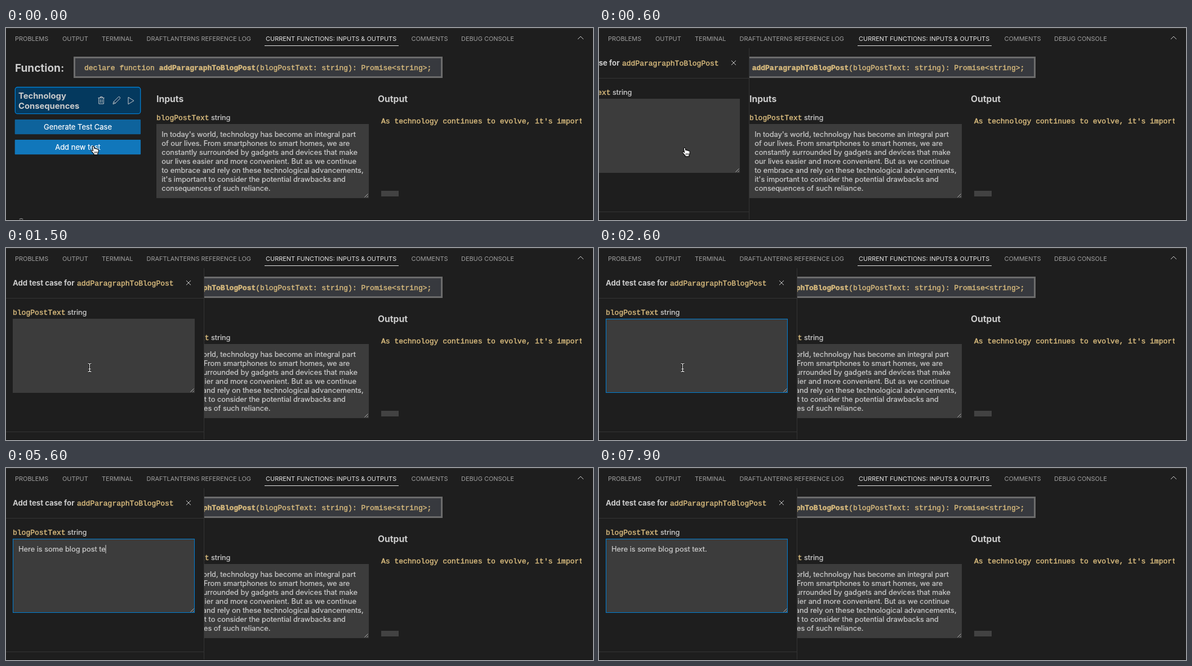
Write an HTML page that moves like this. It is 1042x342 px and loops after 8 s.

```html
<!DOCTYPE html>
<html lang="en">
<head>
<meta charset="utf-8">
<title>Add a test case</title>
<style>
  html, body { margin: 0; width: 100%; height: 100%; overflow: hidden; background: #1e1e1e; }
  svg { display: block; width: 1042px; height: 342px; }
  text { font: 12.83px Inter, "Liberation Sans", sans-serif; fill: #cccccc; stroke: #cccccc; stroke-width: .22px; white-space: pre; }
  .tab { font-size: 10.95px; fill: #a0a0a0; stroke: none; }
  .tab.on { fill: #e7e7e7; }
  .h1, .h2, .h3, .h4 { font-weight: 700; stroke: none; }
  .h1 { font-size: 19px; }
  .h2 { font-size: 15.7px; }
  .h3 { font-size: 14.75px; }
  .h4 { font-size: 13.2px; }
  .btn { font-size: 13px; fill: #ffffff; stroke: #ffffff; text-anchor: middle; }
  .code { font: 13px "Liberation Mono", "Courier New", monospace; fill: #d7ba7d; stroke: #d7ba7d; stroke-width: .45px; }
  .b { font-weight: 700; }
  .icon { fill: none; stroke: #cccccc; stroke-width: 1; stroke-linejoin: round; }
  .rule { fill: #343434; }
</style>
</head>
<body>
<svg viewBox="0 0 1042 342">
  <defs>
    <clipPath id="outClip"><rect x="660" y="150" width="362" height="30"/></clipPath>
    <path id="grip" d="M-7.5 -1.5L-1.5 -7.5M-3.5 -1.5L-1.5 -3.5" fill="none" stroke="#b5b5b5" stroke-width="1"/>
  </defs>
  <rect width="1042" height="342" fill="#1e1e1e"/>
  <rect width="1042" height="1" fill="#333333"/>

  <g id="tabs"></g>
  <rect x="459" y="31" width="238" height="1" fill="#e7e7e7"/>
  <path class="icon" d="M1015 20L1020 15L1025 20"/>

  <text class="h1" x="16" y="77.5">Function:</text>
  <rect x="121.5" y="52.5" width="652" height="35" fill="#37393e" stroke="#6c6c6c" stroke-width="3"/>
  <text class="code" x="139" y="75">declare function <tspan class="b">addParagraphToBlogPost</tspan>(blogPostText: string): Promise&lt;string&gt;;</text>

  <rect x="16.3" y="105.5" width="222.4" height="47.2" rx="4" fill="#04395e" stroke="#007fd4" stroke-width="1.3"/>
  <text class="h3" x="22" y="126">Technology</text>
  <text class="h3" x="22" y="144">Consequences</text>
  <g class="icon">
    <path d="M163.5 124.5H174.5M167.5 124.5V122.5H171V124.5M164.8 124.5V135H173.3V124.5M167.5 127V133M170.5 127V133"/>
    <path d="M190 135.5L191.2 131.2L199.5 122.9Q200.8 122 202 123.2Q203.2 124.5 202.2 125.7L194 134ZM191.2 131.2L194 134"/>
    <path d="M217 123.3L227 129.5L217 135.7Z"/>
  </g>

  <rect x="15.7" y="163" width="223.4" height="26.2" rx="1" fill="#0e639c"/>
  <text class="btn" x="127.5" y="181">Generate Test Case</text>
  <rect x="15.7" y="199" width="223.4" height="26.2" rx="1" fill="#1177bb"/>
  <text class="btn" x="127.5" y="217">Add new test</text>

  <text class="h2" x="267" y="132">Inputs</text>
  <text class="code" x="267" y="164">blogPostText</text>
  <text x="364" y="164">string</text>
  <rect x="267" y="171" width="377" height="132" fill="#3c3c3c"/>
  <g id="story"></g>
  <use href="#grip" x="644" y="303"/>

  <text class="h2" x="660" y="132">Output</text>
  <g clip-path="url(#outClip)">
    <text class="code" x="666" y="170">As technology continues to evolve, it's important to consider</text>
  </g>
  <rect x="666" y="290" width="31" height="10" fill="#424242"/>
  <circle cx="27" cy="343.5" r="4" fill="none" stroke="#b0b0b0"/>

  <g id="panel">
    <rect x="-1" y="36" width="352" height="306" fill="#1e1e1e"/>
    <rect class="rule" x="351" y="36" width="1" height="306"/>
    <rect class="rule" x="-1" y="89" width="352" height="1"/>
    <rect class="rule" x="-1" y="327" width="352" height="1"/>
    <text class="h4" x="12" y="67">Add test case for</text>
    <text class="code" x="126" y="67">addParagraphToBlogPost</text>
    <path class="icon" d="M320 58L328 66M328 58L320 66"/>
    <text class="code" x="12" y="119">blogPostText</text>
    <text x="109" y="119">string</text>
    <rect x="12" y="126" width="323" height="132" fill="#3c3c3c"/>
    <rect id="focus" x="12.5" y="126.5" width="322" height="131" fill="none" stroke="#007fd4"/>
    <use href="#grip" x="335" y="258"/>
    <text id="typed" x="22" y="149"></text>
    <rect id="caret" y="137" width="1" height="15" fill="#d8d8d8"/>
  </g>
  <rect y="341" width="1042" height="1" fill="#131313"/>

  <g id="hand">
    <path d="M-1.6 1C-1.6 -.5 .9 -.7 1.2 .9L1.9 4.3C2.3 3.5 4.1 3.6 4.4 4.8C5.2 4.1 6.6 4.4 6.9 5.5C7.9 5 9.1 5.6 9.2 6.8C9.5 9 9.2 11 7.9 13V15.4H1V13.6C-.6 12 -2 10.2 -3.5 8.8C-4.5 7.6 -3.2 6.3 -1.9 7.1L-.4 8.3Z" fill="#ffffff" stroke="#000000" stroke-width="1.1" stroke-linejoin="round"/>
    <path d="M2.5 9.5V12.8M4.5 9.5V12.8M6.5 9.5V12.8" stroke="#000000" stroke-width=".8"/>
  </g>
  <g id="beam" fill="none">
    <path d="M-3 -7.5Q0 -7.5 0 -5.5Q0 -7.5 3 -7.5M0 -5.5V5.5M-3 7.5Q0 7.5 0 5.5Q0 7.5 3 7.5M-2 2.5H2" stroke="#111111" stroke-width="3"/>
    <path d="M-3 -7.5Q0 -7.5 0 -5.5Q0 -7.5 3 -7.5M0 -5.5V5.5M-3 7.5Q0 7.5 0 5.5Q0 7.5 3 7.5M-2 2.5H2" stroke="#ffffff" stroke-width="1.1"/>
  </g>
</svg>
<script>
const $ = id => document.getElementById(id);
const LOOP = 8000, STEP = 100, CLICK = 2100, BLINK = 500;
const MESSAGE = 'Here is some blog post text.';

// [time, characters present after the edit]
const EDITS = [
  [CLICK, 0], [2800, 1], [3000, 2], [3100, 3], [3200, 5],
  [3400, 6], [3500, 7], [3600, 8], [3700, 10],
  [3900, 11], [4000, 12], [4100, 13], [4300, 14], [4400, 15],
  [4600, 16], [4700, 17], [4800, 18], [5000, 19], [5100, 20],
  [5200, 21], [5300, 22], [5400, 23], [5500, 24], [5600, 25],
  [6200, 24], [6700, 25], [6800, 26], [7000, 27], [7400, 28]
];

function addText(parent, x, y, str, cls) {
  const el = document.createElementNS('http://www.w3.org/2000/svg', 'text');
  el.setAttribute('x', x);
  el.setAttribute('y', y);
  if (cls) el.setAttribute('class', cls);
  el.textContent = str;
  $(parent).append(el);
}

[[16, 'PROBLEMS'], [100, 'OUTPUT'], [170, 'TERMINAL'], [249.5, 'DRAFTLANTERNS REFERENCE LOG'],
 [461, 'CURRENT FUNCTIONS: INPUTS & OUTPUTS'], [719.5, 'COMMENTS'], [808, 'DEBUG CONSOLE']]
  .forEach(([x, label], i) => addText('tabs', x, 23, label, i === 4 ? 'tab on' : 'tab'));

["In today's world, technology has become an integral part",
 'of our lives. From smartphones to smart homes, we are',
 'constantly surrounded by gadgets and devices that make',
 'our lives easier and more convenient. But as we continue',
 'to embrace and rely on these technological advancements,',
 "it's important to consider the potential drawbacks and",
 'consequences of such reliance.']
  .forEach((line, i) => addText('story', 276.3, 194 + 16 * i, line));

const clamp = v => Math.min(1, Math.max(0, v));
const mix = (a, b, k) => a + (b - a) * k;
const span = (t, from, to) => clamp((t - from) / (to - from));
const show = (id, on) => $(id).setAttribute('visibility', on ? 'visible' : 'hidden');
const move = (id, x, y) => $(id).setAttribute('transform', `translate(${x} ${y})`);

// cubic-bezier(.4, 0, .2, 1)
function ease(x) {
  if (x <= 0 || x >= 1) return clamp(x);
  let lo = 0, hi = 1;
  for (let i = 0; i < 24; i++) {
    const s = (lo + hi) / 2, r = 1 - s;
    if (1.2 * r * r * s + .6 * r * s * s + s * s * s < x) lo = s; else hi = s;
  }
  return 3 * (1 - lo) * lo * lo + lo ** 3;
}

function draw(time) {
  const t = Math.floor(time / STEP) * STEP;

  const slide = ease(span(t, 439, 769));
  show('panel', slide > 0);
  move('panel', Math.round(mix(-352, 0, slide)), 0);

  const aim = span(t, 0, 500);
  show('hand', t < 1000);
  move('hand', mix(155, 152, aim), mix(210.5, 213.5, aim));

  const drift = span(t, 900, 1500);
  show('beam', t >= 1000 && t < 2800);
  move('beam', mix(152, 148.5, drift), mix(214, 213, drift));

  const edit = EDITS.filter(e => e[0] <= t).pop();
  show('focus', edit);
  $('typed').textContent = edit ? MESSAGE.slice(0, edit[1]) : '';
  show('caret', edit && t - edit[0] < BLINK);
  $('caret').setAttribute('x', Math.round(22 + $('typed').getComputedTextLength()) - .5);
}

const start = performance.now();
function tick() {
  draw((performance.now() - start) % LOOP);
  requestAnimationFrame(tick);
}
tick();
</script>
</body>
</html>
```
